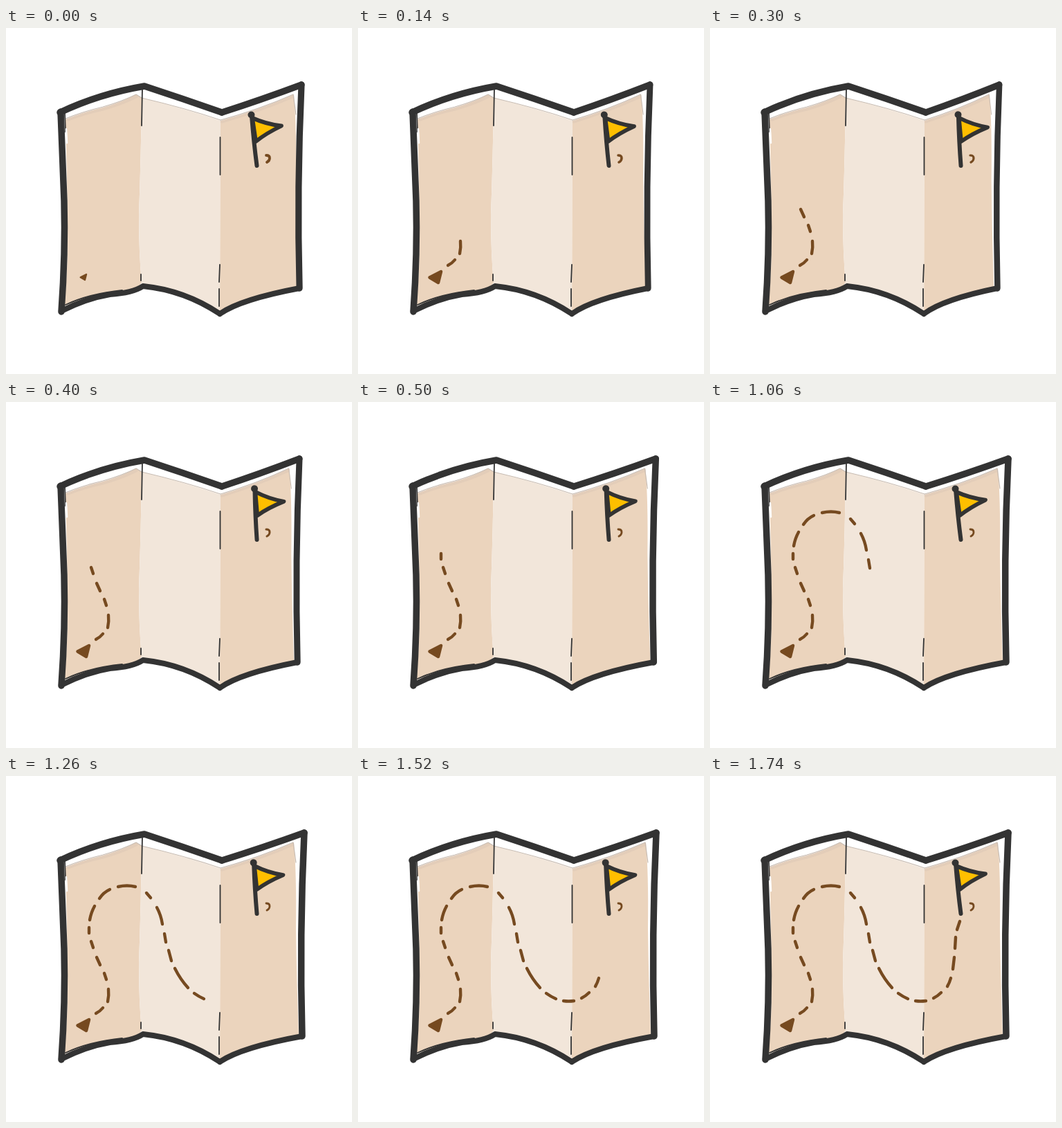
Write an HTML page that moves like this. It is 500 by 500 pixels and loops after 2420 ms.

```html
<!DOCTYPE html>
<html lang="en">
<head>
<meta charset="utf-8">
<title>Map route</title>
<style>
html, body { margin: 0; width: 100%; height: 100%; overflow: hidden; background: #fff; }
svg { display: block; width: 100%; height: 100%; }
path { stroke-linecap: round; stroke-linejoin: round; }
.paper { fill: #ebd4bd; }
.light { fill: #f2e6da; }
.edge { fill: none; stroke: #c8bcb2; stroke-width: 1.2; }
.worn { fill: none; stroke: #a99; stroke-opacity: .13; stroke-width: 5; }
.ink { fill: none; stroke: #333; stroke-width: 9.5; }
.thin { stroke-width: 1.8; }
.brown { fill: none; stroke: #764a20; stroke-width: 4.4; }
</style>
</head>
<body>
<svg viewBox="0 0 500 500">
  <path class="paper" d="M86 132Q110 122 140 115Q168 107 188 96L196 101Q195 190 192 270Q192 325 196 368Q190 377 178 379Q130 382 84 402Q90 345 89 280Q88 210 86 132Z"/>
  <path class="light" d="M196 101Q260 117 310 134L309 410Q255 375 196 370Q192 325 192 270Q195 190 196 101Z"/>
  <path class="worn" d="M90 132Q112 123 140 117Q168 109 188 99"/>
  <path class="edge" d="M86 131Q110 121 140 114Q168 106 188 96L196 101Q260 116 310 133"/>
  <g id="paper">
    <path class="paper" d="M310 134Q365 119 416 96Q420 140 419 220Q420 300 423 374Q350 386 309 410Z"/>
    <path class="worn" d="M312 135Q365 120 414 99"/>
    <path class="edge" d="M310 133Q365 118 415 96L419 125"/>
  </g>
  <path class="ink" d="M78 122Q135 95 200 84Q255 102 312 122"/>
  <path class="ink" d="M79 121Q81 180 84 250Q86 325 80 410"/>
  <path class="ink" style="stroke-width:8" d="M80 409Q115 391 150 385Q183 383 198 373Q258 379 309 413"/>
  <path class="ink thin" d="M85 123L86 150"/>
  <path d="M87 146L88 166" stroke="#fff" stroke-width="2.500"/>
  <path class="ink thin" d="M86 400Q120 384 168 379"/>
  <path class="ink thin" d="M197 86L196 141M195 356V365M309.500 158V212M309 342L308 367M308 377V402"/>
  <g id="frame">
    <path class="ink" d="M312 122Q370 104 431 82"/>
    <path class="ink" d="M431 82Q424 230 428 376"/>
    <path class="ink" style="stroke-width:8" d="M309 413Q340 392 428 376"/>
  </g>
  <path id="arrow" d="M103.500 360.500L120 352L116 368Z" fill="#764a20" stroke="#764a20" stroke-width="4.500"/>
  <g id="route"></g>
  <path id="hook" class="brown" d="M376 184Q381 184 381 188Q381 192 377 194"/>
  <g id="flag">
    <path d="M356 130Q376 139 398 141.500Q376 152 361 164Z" fill="#ffbf00" stroke="#333" stroke-width="5.800"/>
    <path class="ink" style="stroke-width:6" d="M355 127Q358 165 362.500 199"/>
    <circle cx="354.500" cy="125.500" r="5" fill="#333"/>
  </g>
</svg>
<script>
const LOOP = 2420;
const get = id => document.getElementById(id);

const dashes = [
  'M130 343Q136 340 140 335', 'M147 326Q149 317 148 308', 'M145 294L142 285',
  'M136 273L131 262', 'M126 248L123 239', 'M120 227V219',
  'M121 208Q123 197 128 188', 'M135 177Q141 168 150 164', 'M162 160Q175 157 187 160',
  'M203 169L209 176', 'M218 190Q224 201 226 214', 'M229 228L231 240',
  'M235 252L239 267', 'M244 278Q252 294 263 306', 'M272 314Q279 319 286 322',
  'M297 325Q304 326 312 325', 'M323 321Q329 318 334 313', 'M343 304Q346 299 348 292',
  'M351 279L353 262', 'M354 249L355 233', 'M357 222L361 210'
].map(d => {
  const path = document.createElementNS('http://www.w3.org/2000/svg', 'path');
  path.setAttribute('d', d);
  path.setAttribute('class', 'brown');
  return get('route').appendChild(path);
});

// The route rests briefly after the tenth dash.
const dashTime = n => 80 * n + (n < 11 ? -20 : n < 12 ? 0 : 60);
const arch = (t, from, to) =>
  t > from && t < to ? Math.sin(Math.PI * (t - from) / (to - from)) ** 2 : 0;
const about = (id, x, y, change) =>
  get(id).setAttribute('transform', `translate(${x} ${y}) ${change} translate(${-x} ${-y})`);

function draw(t) {
  const squeeze = arch(t, 0, 540);
  const start = t < 270 ? 0.033 * (1 - squeeze) : 0;
  about('paper', 310, 0, `scale(${1 - 0.117 * squeeze} 1)`);
  about('frame', 310, 0, `scale(${1 - 0.11 * squeeze - start} 1)`);
  about('arrow', 112, 360, `scale(${Math.min(1, 0.5 + t / 120)})`);
  about('flag', 362, 200, `rotate(${3.5 * (arch(t, 0, 780) + arch(t, 1040, 1740))})`);
  get('hook').style.strokeWidth = 3.8 - Math.min(1, t / 540);
  dashes.forEach((dash, i) => {
    dash.style.visibility = t >= dashTime(i + 1) ? 'visible' : 'hidden';
  });
}

const begin = performance.now();
function tick() {
  draw((performance.now() - begin) % LOOP);
  requestAnimationFrame(tick);
}
draw(0);
requestAnimationFrame(tick);
</script>
</body>
</html>
```
